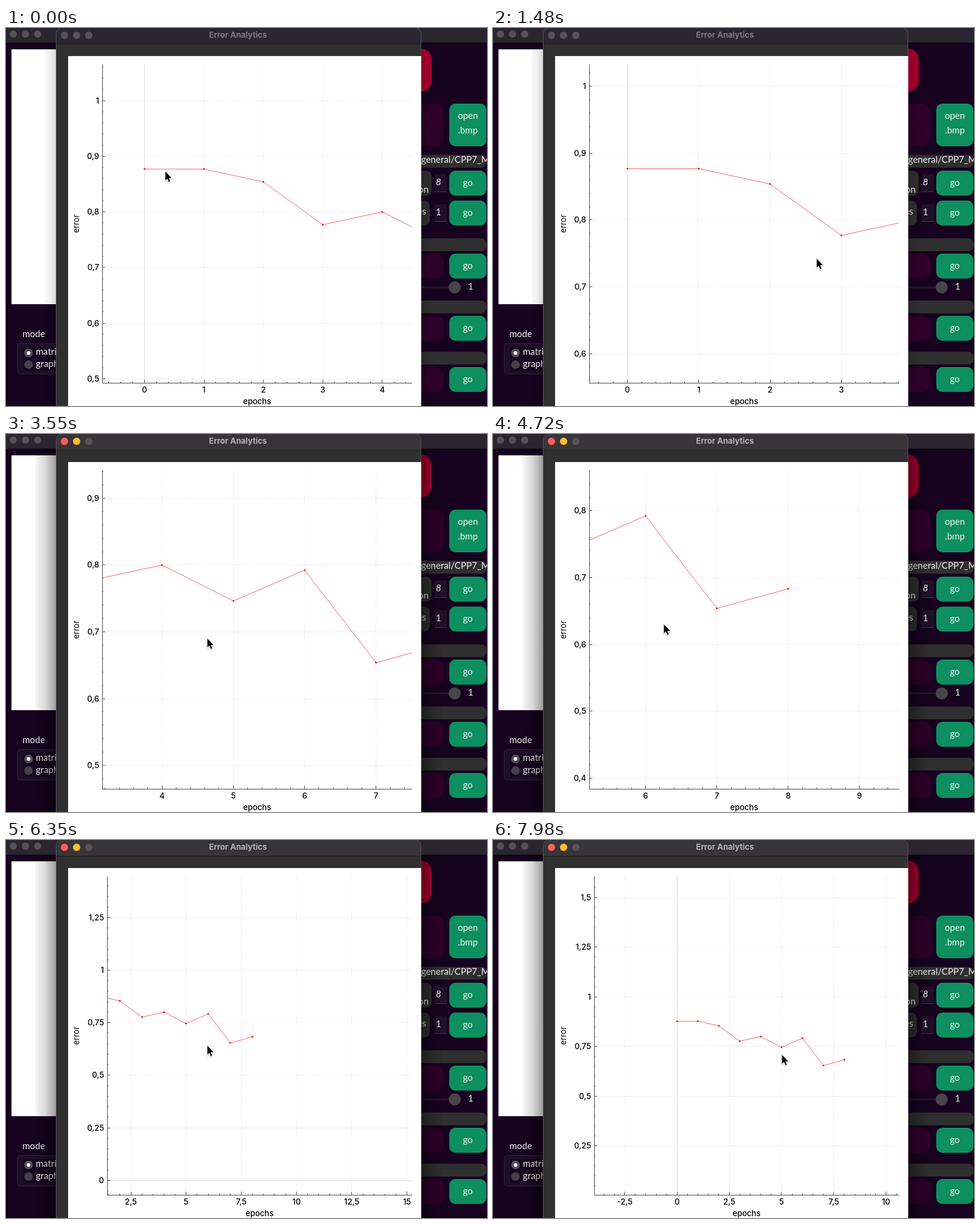
Write an HTML page with a canvas that moves like this. It is 790x620 px and loops after 8 s.

```html
<!DOCTYPE html>
<html lang="en">
<head>
<meta charset="utf-8">
<title>Error Analytics</title>
<style>
html, body { margin: 0; width: 100%; height: 100%; overflow: hidden; background: #17021f; }
canvas { display: block; }
</style>
</head>
<body>
<canvas id="stage" width="790" height="620"></canvas>
<script>
const c = document.getElementById('stage').getContext('2d');
const LOOP = 8000, STEP = 147.5, CLICK = 11;
const LEFT = 158, RIGHT = 667, TOP = 60, BOTTOM = 582;
const UI = 'Inter, "Liberation Sans", sans-serif';
const CHART = '500 13px ' + UI;
const SCRIPT = '15px Lato, "Open Sans", sans-serif';
const SAMPLES = 130;
const errors = [114, 114, 111, 101, 104, 97, 103, 85, 88.8].map(n => n / SAMPLES);

// Replays the user's gestures up to a step: drags carry the chart, zooms scale it about the pointer.
function replay(step) {
  const s = { x: 261, y: 235, x0: 227.5, sx: 97.6, y1: 119, sy: 913, left: LEFT };
  const part = (from, to) => Math.min(1, Math.max(0, (step - from) / (to - from)));

  function move(from, to, x, y) {
    const f = part(from, to), dx = (x - s.x) * f, dy = (y - s.y) * f;
    s.x += dx;
    s.y += dy;
    return [dx, dy];
  }
  function drag(...gesture) {
    const [dx, dy] = move(...gesture);
    s.x0 += dx * (RIGHT - LEFT) / (RIGHT - axisLeft(s.sy));
    s.y1 += dy;
  }
  function zoom(from, to, factor) {
    const k = factor ** part(from, to);
    s.x0 = s.x + (s.x0 - s.x) * k;
    s.y1 = s.y + (s.y1 - s.y) * k;
    s.sx *= k;
    s.sy *= k;
  }

  zoom(0, 5, 1.2);
  move(6, 10, 531, 378);
  drag(10, 15, 299, 307);
  move(16, 18, 524, 364);
  move(19, 20, 531, 364);
  drag(20, 22, 330, 335);
  move(24, 27, 520, 401);
  drag(27, 32, 280, 312);
  drag(32, 34, 336, 341);
  zoom(36, 42, .3147);
  move(42, 43, 330, 337);
  zoom(43, 44, .946);
  move(45, 46, 302, 316);
  move(48, 49, 298, 315);
  drag(49, 54, 474, 352);
  return s;
}

function box(x, y, w, h, r, fill, stroke) {
  c.beginPath();
  c.roundRect(x, y, w, h, r);
  c.fillStyle = fill;
  c.fill();
  if (stroke) { c.strokeStyle = stroke; c.lineWidth = 1; c.stroke(); }
}
function dot(x, y, r, fill) {
  c.beginPath();
  c.arc(x, y, r, 0, 7);
  c.fillStyle = fill;
  c.fill();
}
function rect(x, y, w, h, fill) {
  c.fillStyle = fill;
  c.fillRect(x, y, w, h);
}
function text(s, x, y, font, fill, align = 'left') {
  c.font = font;
  c.fillStyle = fill;
  c.textAlign = align;
  c.fillText(s, x, y);
}
function line(x1, y1, x2, y2) {
  c.beginPath();
  c.moveTo(x1, y1);
  c.lineTo(x2, y2);
  c.stroke();
}
const label = (s, x, y, align) => text(s, x, y, SCRIPT, '#f4f2f5', align);

function green(y, h, ...words) {
  box(728, y, 61, h, 10, '#0d8f60');
  words.forEach((w, i) => label(w, 758.5, y + 25 + i * 24, 'center'));
}
function purple(y, h) {
  box(600, y, 119, h, 14, '#2e0029');
}
function field(value, y, style = '') {
  rect(704, y, 20, 29, '#211029');
  rect(704, y + 28, 20, 1, '#41324a');
  text(value, 706, y + 18, style + SCRIPT, '#f4f2f5');
}

function shadow(edge, end, alpha) {
  const g = c.createLinearGradient(edge, 0, end, 0);
  g.addColorStop(0, `rgba(0,0,0,${alpha})`);
  g.addColorStop(.5, `rgba(0,0,0,${alpha * .4})`);
  g.addColorStop(1, 'rgba(0,0,0,.03)');
  rect(Math.min(edge, end), 24, Math.abs(end - edge), 596, g);
}

function backWindow(active) {
  rect(0, 0, 790, 620, '#17021f');
  rect(0, 0, 790, 24, '#2a252f');
  rect(0, 24, 790, 1, '#0e0114');
  for (const x of [12, 32, 52]) dot(x, 10, 6, '#555159');
  rect(9, 35, 80, 418, '#fff');

  label('mode', 27, 507);
  box(18.5, 517.5, 90, 50, 4, '#1f0e29', '#30223a');
  rect(28, 523, 60, 40, '#17061f');
  dot(37, 533, 7, '#58515d');
  dot(37, 533, 3, '#fff');
  dot(37, 552, 7, '#4a404d');
  label('matrix', 49, 536);
  label('graph', 49, 556);

  box(600, 34, 99, 70, 17, '#a8002f');
  purple(124, 70);
  green(124, 70, 'open', '.bmp');
  for (const y of [370, 472, 556]) {
    purple(y, 41);
    green(y, 41, 'go');
  }
  for (const y of [208, 345, 447, 531]) box(600, y, 189, 21, 8, '#2f2f2f');
  label('general/CPP7_M', 682, 221);

  box(600, 234, 99, 41, 9, '#2f2f2f');
  label('on', 694, 270, 'right');
  field('8', 240, 'italic ');
  green(234, 41, 'go');
  box(600, 283, 96, 41, 9, '#2f2f2f');
  label('es', 690, 306, 'right');
  field('1', 289);
  green(283, 41, 'go');

  rect(670, 424, 60, 3, '#27152e');
  dot(737, 425.5, 10, '#48444b');
  label('1', 763, 429, 'center');

  const reach = active ? 34 : 18, alpha = active ? .38 : .16;
  shadow(82, 82 - reach, alpha);
  shadow(682, 682 + reach, alpha);
}

function frontWindow(active) {
  box(82.5, -.5, 599, 640, 10, '#303030', '#58545a');
  box(83, 0, 598, 26, [10, 10, 0, 0], active ? '#38353a' : '#2b2731');
  rect(83, 26, 598, 1, '#1a1a1a');
  const lights = active ? ['#fe5f57', '#febc2e', '#57535a'] : Array(3).fill('#57535b');
  lights.forEach((fill, i) => dot(96 + i * 20, 12, 6, fill));
  text('Error Analytics', 381, 16, '700 13px ' + UI, active ? '#b5b3b6' : '#7d7983', 'center');
  rect(102, 46, 580, 574, '#fff');
}

// Round a range to a readable step of 1, 2, 2.5, 5 or 10, with about five ticks.
function tickStep(range) {
  const raw = range / 5, mag = 10 ** Math.floor(Math.log10(raw));
  const near = [1, 2, 2.5, 5, 10].reduce((a, b) =>
    Math.abs(b - raw / mag) < Math.abs(a - raw / mag) ? b : a);
  return { size: near * mag, parts: near === 2 ? 4 : 5 };
}
function ticks(lo, hi, { size, parts }, draw) {
  const small = size / parts;
  for (let i = Math.ceil(lo / small); i * small <= hi; i++)
    draw(+(i * small).toFixed(6), i % parts === 0);
}
const number = v => String(v || 0).replace('.', ',');

// Labels with two decimals push the axis to the right.
function axisLeft(sy) {
  const tenths = tickStep((BOTTOM - TOP) / sy).size * 10;
  return Number.isInteger(+tenths.toFixed(6)) ? LEFT : LEFT + 8;
}

function chart(view) {
  const { y1, sy } = view, left = axisLeft(sy);
  const fit = (RIGHT - left) / (RIGHT - LEFT);
  const x0 = left + (view.x0 - LEFT) * fit, sx = view.sx * fit;
  const px = v => x0 + v * sx, py = v => y1 + (1 - v) * sy;
  const snap = v => Math.floor(v) + .5;
  const grid = zero => {
    c.strokeStyle = zero ? '#dcdcdc' : '#eaeaea';
    c.setLineDash(zero ? [] : [2, 1]);
  };
  const solid = () => { c.strokeStyle = '#4c4c4c'; c.setLineDash([]); };
  c.lineWidth = 1;

  ticks((left - x0) / sx, (RIGHT - x0) / sx, tickStep((RIGHT - left) / sx), (v, major) => {
    const x = snap(px(v));
    if (major) {
      grid(v === 0);
      line(x, TOP, x, BOTTOM);
      text(number(v), px(v), 598, CHART, '#000', 'center');
    }
    solid();
    line(x, BOTTOM, x, BOTTOM - (major ? 5 : 2));
  });
  ticks(1 - (BOTTOM - y1) / sy, 1 - (TOP - y1) / sy, tickStep((BOTTOM - TOP) / sy), (v, major) => {
    const y = snap(py(v));
    if (major) {
      grid(v === 0);
      line(left, y, RIGHT, y);
      text(number(v), left - 5, py(v) + 4.5, CHART, '#000', 'right');
    }
    solid();
    line(left, y, left + (major ? 5 : 2), y);
  });
  line(left + .5, TOP, left + .5, BOTTOM + 1);
  line(left, BOTTOM + .5, RIGHT, BOTTOM + .5);

  text('epochs', (left + RIGHT) / 2, 617, CHART, '#000', 'center');
  c.save();
  c.translate(120, 321);
  c.rotate(-Math.PI / 2);
  text('error', 0, 0, '13px ' + UI, '#000', 'center');
  c.restore();

  c.save();
  c.beginPath();
  c.rect(left, TOP, RIGHT - left, BOTTOM - TOP);
  c.clip();
  c.beginPath();
  errors.forEach((e, i) => c.lineTo(px(i), py(e)));
  c.strokeStyle = 'rgba(255,0,0,.68)';
  c.lineWidth = .9;
  c.stroke();
  errors.forEach((e, i) => dot(px(i), py(e), 1.4, '#f00'));
  c.restore();
}

const arrow = new Path2D('M0 0V14.5L3.3 11.5 5.6 17 7.9 16 5.7 10.6H10.2Z');
function pointer({ x, y }) {
  c.save();
  c.translate(x + .7, y + .5);
  c.shadowColor = 'rgba(0,0,0,.25)';
  c.shadowBlur = 2;
  c.shadowOffsetY = 1;
  c.strokeStyle = '#fff';
  c.lineWidth = 2;
  c.stroke(arrow);
  c.shadowColor = 'transparent';
  c.fillStyle = '#000';
  c.fill(arrow);
  c.restore();
}

function draw(now) {
  const step = Math.floor((now % LOOP + 2) / STEP);
  const active = step >= CLICK;
  const state = replay(step);
  backWindow(active);
  frontWindow(active);
  chart(state);
  pointer(state);
  requestAnimationFrame(draw);
}
requestAnimationFrame(draw);
</script>
</body>
</html>
```
